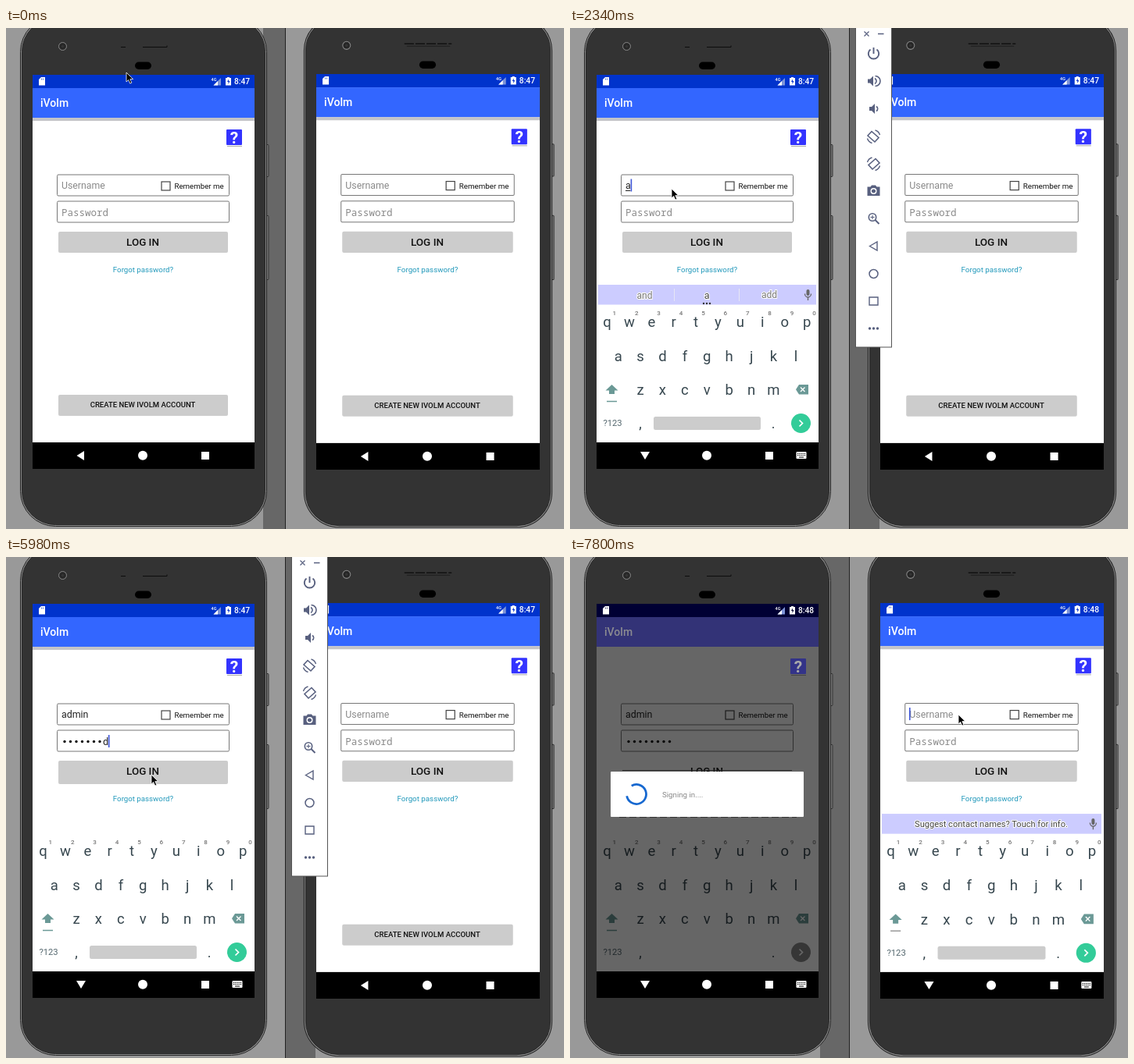
These frames come from a looping animation (714 by 642 pixels, 8000 ms). An HTML page:

```html
<!DOCTYPE html>
<html lang="en">
<head>
<meta charset="utf-8">
<title>Two phones signing in</title>
<style>
html, body { margin: 0; width: 100%; height: 100%; overflow: hidden; background: #999; }
svg { display: block; width: 714px; height: 642px; font-family: Roboto, "Noto Sans", sans-serif; }
.mono { font-family: "Noto Sans Mono", "Liberation Mono", monospace; }
</style>
</head>
<body>
<svg id="stage" viewBox="0 0 714 642"></svg>
<script>
const LOOP = 8000, TICK = 260;
const APP = 'iVolm';
const SECRET = 'password';
const INK = '#58607f';
const stage = document.getElementById('stage');

const clamp = (v, lo, hi) => Math.max(lo, Math.min(hi, v));
const rect = (x, y, w, h, fill, more = '') =>
  `<rect x="${x}" y="${y}" width="${w}" height="${h}" fill="${fill}" ${more}/>`;
const circle = (x, y, r, fill, more = '') =>
  `<circle cx="${x}" cy="${y}" r="${r}" fill="${fill}" ${more}/>`;
const path = (d, fill, more = '') => `<path d="${d}" fill="${fill}" ${more}/>`;
const line = (d, color, width = 1, more = '') =>
  path(d, 'none', `stroke="${color}" stroke-width="${width}" ${more}`);
const text = (x, y, s, size, fill, more = '') =>
  `<text x="${x}" y="${y}" font-size="${size}" fill="${fill}" ${more}>${s}</text>`;
const MID = 'text-anchor="middle"';
const BOLD = 'font-weight="500"';

function body(sharpSpeaker) {
  const speaker = sharpSpeaker
    ? line('M146 21.5H206', '#111', 1.5, 'stroke-dasharray="12 2"') + line('M149 24.5H204', '#1c1c1c')
    : line('M147 24.5h6M175 24.5h31v-2', '#0c0c0c');
  const button = (y, h) => rect(332, y, 4, h, '#777', 'stroke="#333" rx="1"');
  return button(149.5, 41) + button(240.5, 82) +
    rect(18.5, -14.5, 315, 653, '#8c8c8c', 'rx="45" stroke="#222"') +
    rect(20.5, -12.5, 311, 649, '#333', 'rx="43" stroke="#292929"') +
    circle(72.5, 23.5, 5, '#2b2b2b', 'stroke="#888"') + circle(72.5, 23.5, 2.5, '#333', 'stroke="#222"') +
    speaker + rect(165, 43.5, 21, 9.5, '#000', 'rx="4.7"');
}

function statusBar(clock, dim) {
  return rect(34, 60, 284, 17, dim ? '#000033' : '#0033cc') +
    path('M45 63h5v10.500h-8v-7.500z', '#fff') +
    line('M45.500 64.500v2M47.500 64.500v2', dim ? '#000033' : '#0033cc', .7) +
    text(262.5, 68, '4G', 5.5, '#fff', BOLD) +
    path('M275 64v9.500h-9.500z', '#7f95d8') + path('M271 68v5.500h-5.500z', '#fff') +
    path('M283 63h3v1h2v9.500h-7v-9.500h2z', '#fff') +
    path('M285 65.500l-2 3.500h1.500v3l2-4h-1.500z', dim ? '#000033' : '#0033cc') +
    text(292, 72, clock, 10.2, '#fff', BOLD);
}

function appBar(dim) {
  return rect(34, 77, 284, 38, dim ? '#333377' : '#3366ff') +
    (dim ? '' : rect(34, 115, 284, 4, '#c4c4c8')) +
    text(44, 101, APP, 14, dim ? '#8b8b91' : '#fff', BOLD);
}

function helpIcon(dim) {
  return rect(282, 130, 20, 20, dim ? '#333388' : '#3333ff', 'rx="1"') +
    line('M283 151.500H302', dim ? '#444' : '#aaa') +
    text(292, 147.5, '?', 21, dim ? '#aaa' : '#fff', MID + ' font-weight="700"');
}

const caret = (x, y) => line(`M${x} ${y}v16`, '#3d55d8', 1.6);

function form(p) {
  const box = y => rect(65.5, y, 220, 27, '#fff', 'rx="1.5" stroke="#777"');
  const button = (y, h) => p.dim ? '' : rect(67, y, 217, h, '#ccc', 'rx="2"');
  let s = box(188) + box(222) + button(261, p.pressed ? 30 : 27) + button(470, 27);
  s += p.user
    ? text(71, 206, p.user, 12.4, '#222')
    : text(71, 206, 'Username', 12.3, '#8a8a8a');
  const userEnd = 71.5 + p.user.length * 6.9;
  if (p.user && p.focus === 'user') s += line(`M71 208.500H${userEnd - 1}`, '#222');
  if (p.focus === 'user') s += caret(userEnd, 193.5);
  s += rect(199, 197, 11, 11, '#fff', 'stroke="#444" stroke-width="1.2"') +
    text(215.5, 206, 'Remember me', 9.7, '#111');

  const dots = p.masked ? p.typed : p.typed - 1;
  for (let i = 0; i < dots; i++) s += circle(75 + i * 7.5, 236.5, 1.7, '#111');
  if (p.typed && !p.masked) s += text(71.5 + dots * 7.5, 241, SECRET[dots], 12.6, '#222');
  if (!p.typed) s += text(71, 241, 'Password', 12.5, '#8a8a8a', 'class="mono" font-weight="300"');
  if (p.focus === 'pass') s += caret(71.7 + p.typed * 7.5, 228);

  return s + text(175, 279, 'LOG IN', 13.4, '#111', MID + BOLD.padStart(20)) +
    text(175.5, 313, 'Forgot password?', 9.7, '#2299bb', MID) +
    text(175, 486, `CREATE NEW ${APP.toUpperCase()} ACCOUNT`, 9.5, '#111', MID + ' ' + BOLD);
}

function suggestions(words) {
  let s = rect(36, 329, 279, 25.5, '#ccccff');
  const halo = MID + ' stroke="#fff" stroke-width="2" paint-order="stroke"';
  if (words.length === 1) {
    s += text(175, 346, words[0], 11, '#444', halo);
  } else if (words.length) {
    s += text(95.5, 346.5, words[0], 12, '#777', halo) +
      text(175, 346.5, words[1], 12.4, '#444', halo) +
      text(255, 346, words[2], words[2].length > 9 ? 10 : 12, '#777', halo) +
      line('M133.500 334v16M216.500 334v16', '#e6e6f4');
    for (const dx of [-4, 0, 4]) s += circle(175 + dx, 353, 1.2, '#333');
  }
  return s + rect(302.5, 335, 4, 8, '#666', 'rx="2"') +
    line('M300.500 340.500a4 4.500 0 0 0 8 0M304.500 345v4', '#666', 1.3);
}

function keyboard(p) {
  const key = '#37474f', teal = '#6b9996', step = 28.4;
  let s = rect(34, 329, 284, 202, '#fff');
  if (p.words) s += suggestions(p.words);
  const row = (keys, x, y) => [...keys].forEach((k, i) => {
    s += text(x + i * step, y, k, 18.5, key, MID);
  });
  row('qwertyuiop', 47.5, 383);
  row('asdfghjkl', 61.7, 426.5);
  row('zxcvbnm', 90, 470);
  for (let i = 0; i < 10; i++) s += text(56.8 + i * step, 367.5, (i + 1) % 10, 8, '#777', MID + ' ' + BOLD);
  s += path('M53.500 457l8 7.500h-4.500v4.500h-7v-4.500h-4.500z', teal) +
    line('M47 478.500H60', p.plainShift ? '#999' : teal, 1.5) +
    path('M293 457h12v12.500h-12l-4-6.200z', teal) +
    line('M295 460.500l5.500 5.500m0-5.500l-5.500 5.500', '#fff', 1.4) +
    text(54.5, 510, '?123', 11.2, '#55686f', MID) +
    text(90, 513, ',', 18, key, MID) + text(260, 513, '.', 18, key, MID);
  if (!p.dim) s += rect(107, 498, 137, 17, '#ccc', 'rx="2.5"');
  return s + circle(295.5, 506.5, 12.5, p.dim ? '#888' : '#33cc99') +
    line('M293.500 502.500l4 4-4 4', '#fff', 1.7);
}

function navBar(open) {
  let s = rect(34, 531, 284, 34, '#000') +
    path(open ? 'M90 543h12l-6 10z' : 'M90.500 548l9.500-6v12z', '#fff') +
    circle(175, 547.8, 6, '#fff') + rect(250, 543, 10, 10, '#fff');
  if (open) {
    s += rect(289.5, 543, 13, 9, '#fff', 'rx="1"') +
      line('M291 545.500h10M291 547.500h10', '#000', 1, 'stroke-dasharray="1.2 1"') +
      line('M293 550h6', '#000');
  }
  return s;
}

// Arc that grows, then lets its tail catch up, while slowly turning.
function spinner(ms) {
  const cycles = ms / 1333 + 0.333, phase = cycles % 1;
  const grow = clamp(phase * 2, 0, 1) ** 2 * 270;
  const tail = clamp(phase * 2 - 1, 0, 1) ** 2 * 270;
  const from = -60 + ms * 0.0192 + Math.floor(cycles) * 270 + tail;
  const to = from + 20 + grow - tail;
  const at = a => `${85 + 12.5 * Math.cos(a * Math.PI / 180)} ${304 + 12.5 * Math.sin(a * Math.PI / 180)}`;
  return line(`M${at(from)}A12.500 12.500 0 ${to - from > 180 ? 1 : 0} 1 ${at(to)}`, '#1668d0', 2.8);
}

function dialog(ms) {
  return line('M67 273.500H284', '#2a2a2a') +
    (ms < TICK ? line('M134 262.500H230M130 271.500H233', '#2a2a2a') : '') +
    line('M63 333.500H290', '#333', 1, 'stroke-dasharray="9 4"') +
    rect(52, 275, 247, 58, '#fff', 'rx="1"') + spinner(ms) +
    text(118, 308, 'Signing in....', 9.7, '#888');
}

function phone(p) {
  return body(p.sharpSpeaker) + rect(34, 60, 284, 505, '#fff') + form(p) +
    (p.keys ? keyboard(p) : '') +
    (p.dim ? rect(34, 115, 284, 416, '#000', 'opacity=".6"') : '') +
    statusBar(p.clock, p.dim) + appBar(p.dim) + helpIcon(p.dim) + navBar(p.open) +
    (p.dim ? dialog(p.waited) : '');
}

function toolbar() {
  const put = (y, s) => `<g transform="translate(388.500 ${y})">${s}</g>`;
  const ink = (d, w = 1.6) => line(d, INK, w);
  const speaker = path('M-7.500-2.500h3l4-4v13l-4-4h-3z', INK);
  const turn = flip => `<g transform="scale(${flip} 1)">` +
    ink('M-2.500-6.500l9 8-5 5.500-9-8z') + ink('M2-8a9 9 0 0 1 6 6M-2 8.500a9 9 0 0 1-6-6', 1.4) + '</g>';
  return rect(365.5, -1, 46, 410, '#fff', 'stroke="#555"') +
    line('M376.500 4.500l6 6m0-6l-6 6M394 7.500h7.500', INK, 1.3) +
    put(33, ink('M0-8v8M-4-5.500a6.700 6.700 0 1 0 8 0', 1.9)) +
    put(68, speaker + ink('M1.500-3.500a4 4 0 0 1 0 7M2-6.500a6.500 6.500 0 0 1 0 13')) +
    put(103.5, `<g transform="translate(2 0)">${speaker}</g>` + ink('M3.500-3a3.500 3.500 0 0 1 0 6')) +
    put(139, turn(1)) + put(174, turn(-1)) +
    put(208.5, path('M-8-5h4l1.500-2h5l1.500 2h4v11.500h-16z', INK) + circle(0, .5, 3.3, INK, 'stroke="#fff" stroke-width="1.4"')) +
    put(244, circle(-1.5, -1.5, 4.7, 'none', `stroke="${INK}" stroke-width="1.600"`) +
      ink('M2 2l5 5', 2) + ink('M-4-1.500h5M-1.500-4v5', 1.1)) +
    put(279.5, ink('M-5 0l9.500-5.500v11z', 1.4)) +
    put(315, circle(0, 0, 5.5, 'none', `stroke="${INK}" stroke-width="1.500"`)) +
    put(350, ink('M-5.500-5h11v10h-11z', 1.4)) +
    put(385, [-5, 0, 5].map(x => circle(x, 0, 1.7, INK)).join(''));
}

const MOUSE = [[0, 154, 57], [2, 154, 57], [5, 130, 206], [20, 130, 206],
  [23, 186, 279], [25, 186, 279], [27, 497, 202], [31, 497, 202]];

function mouse(n) {
  const i = MOUSE.findIndex(k => k[0] > n);
  const [a, ax, ay] = MOUSE[i - 1], [b, bx, by] = MOUSE[i];
  const u = (n - a) / (b - a), e = u * u * (3 - 2 * u);
  return `<g transform="translate(${ax + (bx - ax) * e} ${ay + (by - ay) * e})">` +
    path('M0 0v12l2.700-2.600 2 4.700 2.100-.900-2-4.600h3.900z', '#000', 'stroke="#fff" stroke-width=".8"') + '</g>';
}

function leftPhone(n) {
  const user = 'admin'.slice(0, clamp(Math.round((n - 8) * 1.25), 0, 5));
  const late = user.length > 2;
  const words = user
    ? [late ? 'admitted' : 'and', user.slice(0, Math.max(1, user.length - 1)), late ? 'administration' : 'add']
    : [];
  return {
    user, clock: n < 27 ? '8:47' : '8:48',
    typed: clamp(n - 14, 0, 8), masked: n >= 25,
    focus: n < 7 || n >= 25 ? '' : n < 14 ? 'user' : 'pass',
    open: n >= 7, keys: n >= 8, words: n < 14 ? words : null,
    pressed: n === 23, dim: n >= 24, waited: (n - 24) * TICK
  };
}

function rightPhone(n) {
  return {
    user: '', typed: 0, clock: n < 27 ? '8:47' : '8:48', sharpSpeaker: true,
    focus: n >= 28 ? 'user' : '', open: n >= 28, keys: n >= 29, plainShift: true,
    words: ['Suggest contact names? Touch for info.']
  };
}

function scene(n) {
  const tools = n >= 4 && n < 27;
  const band = tools ? [358, 396] : [n < 4 ? 329 : 320, 357];
  return rect(0, 0, 714, 642, '#999') +
    rect(band[0], 0, band[1] - band[0], 642, '#676767') +
    line('M357.500 0V642', '#222') +
    phone(leftPhone(n)) +
    `<g transform="matrix(1.007 0 0 1.004 362.760 -1.240)">${phone(rightPhone(n))}</g>` +
    (tools ? toolbar() : '') + mouse(n);
}

let shown = -1;
const start = performance.now();
function draw(now) {
  const n = Math.floor(Math.max(0, now - start) % LOOP / TICK);
  if (n !== shown) stage.innerHTML = scene(shown = n);
  requestAnimationFrame(draw);
}
draw(start);
</script>
</body>
</html>
```
